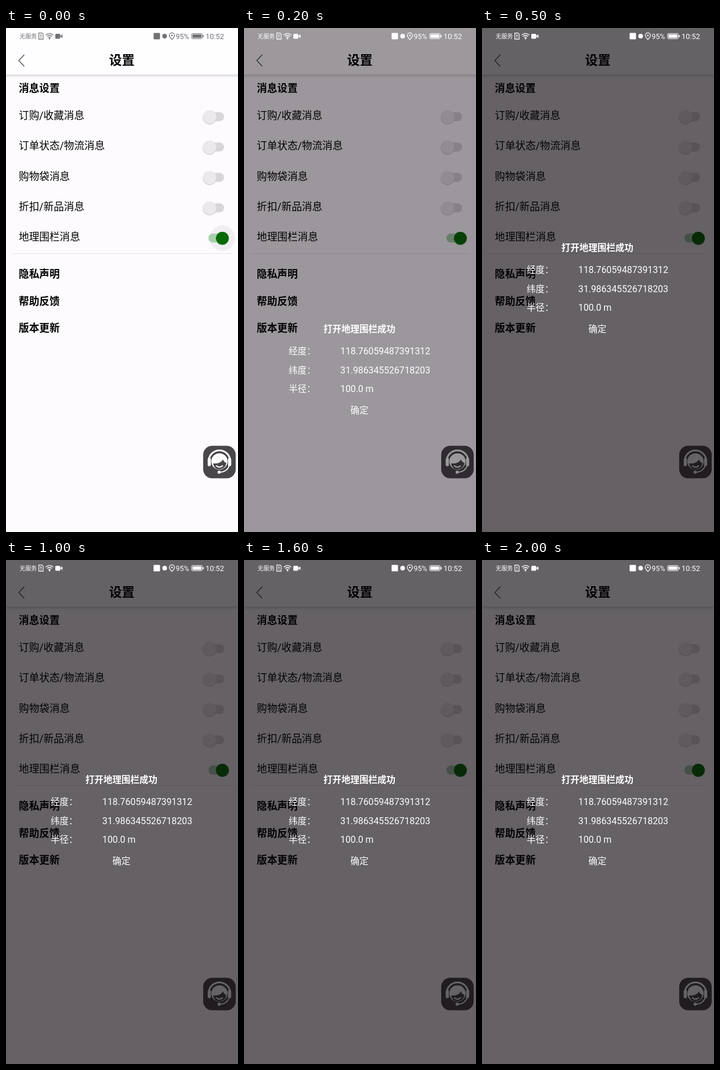
An HTML page for the animation above (2.1 s loop, 400 by 868 pixels).

```html
<!DOCTYPE html>
<html lang="zh-CN">
<head>
<meta charset="utf-8">
<style>
  html, body { margin: 0; width: 100%; height: 100%; overflow: hidden; background: #fdfbfe; }
  svg { display: block; width: 400px; height: 868px; font-family: Roboto, "Noto Sans CJK SC", "Noto Sans CJK", sans-serif; }
  .label { font-size: 17.65px; }
  .bold { font-weight: 700; }
  .popup { font-size: 15.5px; fill: #fff; }
  .value { font-size: 15.8px; }
</style>
</head>
<body>
<svg viewBox="0 0 400 868">
  <defs>
    <linearGradient id="shade" x2="0" y2="1">
      <stop stop-color="#d9d7da"/>
      <stop offset="1" stop-color="#fdfbfe"/>
    </linearGradient>
    <g id="switchOff">
      <rect x="-8" y="-8" width="33" height="15.5" rx="7.7" fill="#d8d6d9"/>
      <circle cy="1" r="11.9" fill="#cfcdd0"/>
      <circle r="11.5" fill="#ebe9ec"/>
    </g>
  </defs>

  <rect width="400" height="868" fill="#fdfbfe"/>
  <rect y="80" width="400" height="6" fill="url(#shade)"/>
  <rect width="400" height="80" fill="#fefdff"/>
  <path d="M31.5 46L22 56L31.5 66" fill="none" stroke="#444" stroke-width="1.2"/>
  <text x="199.7" y="63" text-anchor="middle" font-size="22" class="bold">设置</text>
  <g id="rows"></g>
  <path d="M11 388.5H389" stroke="#e4e2e5"/>

  <circle id="ripple" cx="373" cy="362" r="22" fill="#f0eef1"/>
  <rect x="349" y="354" width="33" height="15.5" rx="7.7" fill="#a9cfad"/>
  <circle cx="373" cy="362.6" r="11.5" fill="#a3bfa5"/>
  <circle cx="373" cy="362" r="11" fill="#076a08"/>

  <g fill="none" stroke="#fff">
    <rect x="340" y="719.5" width="56" height="56" rx="15.5" fill="#49474a" stroke="none"/>
    <path d="M349.500 746A18.500 18.500 0 0 1 386.500 746" stroke-width="3"/>
    <path d="M350.500 743V752M385.500 743V752" stroke-width="5.500" stroke-linecap="round"/>
    <circle cx="368" cy="746.500" r="14" fill="#fff" stroke="none"/>
    <path d="M357 750Q370 751 374 743Q376 748 380 749Q378 760 368 760Q359 760 357 750Z" fill="#49474a" stroke="none"/>
    <path d="M362 753.500Q368 759 374 753.500" stroke-width="1.800"/>
    <path d="M385 753Q382 764 369 765" stroke-width="1.800"/>
    <circle cx="367.500" cy="765" r="2.700" fill="#fff" stroke="none"/>
  </g>

  <rect id="dim" width="400" height="868" fill="#080208"/>

  <g id="status" fill="currentColor">
    <text x="23.5" y="18" font-size="9.9">无服务</text>
    <path d="M56.6 8.6H62L64 10.6V19.4H56.6Z" fill="none" stroke="currentColor" stroke-width="1.2"/>
    <path d="M59.6 11h1.4v4h-1.4zM59.6 16h1.4v1.4h-1.4z"/>
    <path d="M68.5 12.2Q75 6.5 81.5 12.2M70.7 14.6Q75 10.8 79.3 14.6M72.8 16.8Q75 15 77.2 16.8" fill="none" stroke="currentColor" stroke-width="1.3"/>
    <circle cx="75" cy="18.2" r="1.2"/>
    <rect x="85" y="10" width="8.5" height="8.5" rx="1.5"/>
    <path d="M93 14L97.3 11V17.5Z"/>
    <rect x="254.5" y="8.5" width="11" height="11" rx="1"/>
    <circle cx="273.5" cy="14" r="4"/>
    <path d="M286 19.8Q281.5 15.5 281.5 12.8A4.5 4.5 0 0 1 290.5 12.8Q290.5 15.5 286 19.8Z" fill="none" stroke="currentColor" stroke-width="1.2"/>
    <circle cx="286" cy="12.8" r="1.4"/>
    <text x="292.5" y="18.5" font-size="12.5">95%</text>
    <rect x="320" y="9.5" width="18.5" height="9" rx="2" fill="none" stroke="currentColor"/>
    <rect x="321.5" y="11" width="15.5" height="6" rx=".8"/>
    <rect x="339.5" y="12" width="1.5" height="4" rx=".7"/>
    <text x="344" y="18.5" font-size="12.8">10:52</text>
  </g>

  <g id="popup" class="popup"></g>
</svg>
<script>
const $ = id => document.getElementById(id);
const label = (x, y, text, cls = '') => `<text x="${x}" y="${y}" class="${cls}">${text}</text>`;

const options = ['订购/收藏消息', '订单状态/物流消息', '购物袋消息', '折扣/新品消息', '地理围栏消息'];
const sections = [['消息设置', 110], ['隐私声明', 430.3], ['帮助反馈', 476.7], ['版本更新', 523]];
$('rows').innerHTML =
  sections.map(([text, y]) => label(22, y, text, 'label bold')).join('') +
  options.map((text, i) => label(22, 156.8 + i * 52.4, text, 'label')).join('') +
  [0, 1, 2, 3].map(i => `<use href="#switchOff" x="351" y="${153 + i * 52.3}"/>`).join('');

// Popup coordinates are relative to the middle of its heading.
const details = [['经度：', '118.76059487391312'], ['纬度：', '31.986345526718203'], ['半径：', '100.0 m']];
$('popup').innerHTML =
  label(137, 5.4, '打开地理围栏成功', 'bold') +
  details.map(([name, value], i) =>
    label(77, 43.4 + i * 32.2, name) + label(166, 43.4 + i * 32.2, value, 'value')).join('') +
  label(183.5, 145.4, '确定');

const LOOP = 2100, STEP = 100;
const dimming = [0, 0.045, 0.4, 0.615];
const popupY = [868, 868, 519, 386, 380, 379];
const at = (list, i) => list[Math.min(i, list.length - 1)];

function draw(now) {
  const step = Math.floor(now % LOOP / STEP);
  $('dim').setAttribute('opacity', at(dimming, step));
  $('ripple').style.display = step ? 'none' : '';
  $('status').style.color = step ? '#fff' : '#727073';
  $('popup').style.display = step < 2 ? 'none' : '';
  $('popup').setAttribute('transform', `translate(0 ${at(popupY, step)})`);
}

const start = performance.now();
function tick() {
  draw(performance.now() - start);
  requestAnimationFrame(tick);
}
tick();
</script>
</body>
</html>
```
